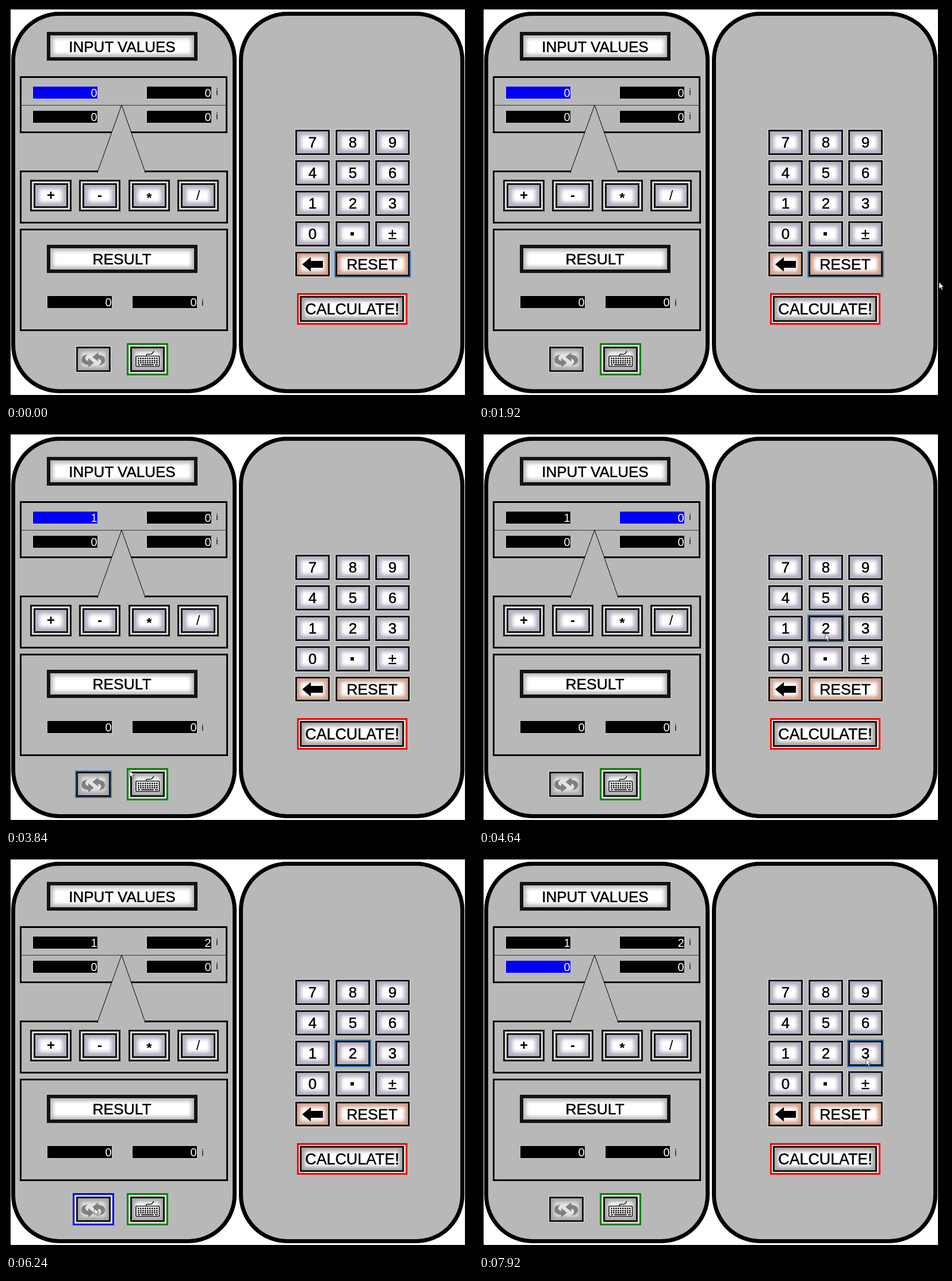
Animation, 812 px wide and 690 px high, one loop 8 s. Source, as an HTML page:

```html
<!DOCTYPE html>
<html lang="en">
<head>
<meta charset="utf-8">
<title>Complex number calculator</title>
<style>
  html, body { margin: 0; width: 100%; height: 100%; overflow: hidden; background: #000; }
  div, svg { position: absolute; box-sizing: border-box; }
  svg { left: 0; top: 0; font-family: "Liberation Sans", Arial, sans-serif; }
  .panel { background: #b8b8b9; border: 7px solid #000; border-radius: 84px; }
  .group { border: 3px solid #000; }
  .title { border: 6px solid #141414; background: #fff; box-shadow: inset 0 0 6px 5px #b9b9b9; }
  .key { border: 3px solid #141414; background: #fff; outline: 1px solid #e9e9e9; }
  .lilac { box-shadow: inset 0 0 6px 7px #b5afc1; }
  .peach { box-shadow: inset 0 0 6px 6px #cf9f8a; }
  .gray { box-shadow: inset 0 0 6px 6px #a6a6a6; }
  .dim { background: #e4e4e4; }
  .frame { border: 3px solid; background: #d5d8d0; }
  .ring { border: 2px solid #3f7fbf; }
  .field { border: 1px solid #c8c8c4; background: #000; }
</style>
</head>
<body>
<svg id="art" width="812" height="690" viewBox="0 0 812 690"></svg>
<script>
const art = document.getElementById('art');

function box(x, y, w, h, cls, color) {
  const el = document.createElement('div');
  el.className = cls;
  el.style.cssText = `left:${x}px;top:${y}px;width:${w}px;height:${h}px`;
  if (color) el.style.borderColor = color;
  document.body.insertBefore(el, art);
  return el;
}

function shape(name, attrs) {
  const el = document.createElementNS('http://www.w3.org/2000/svg', name);
  for (const key in attrs) el.setAttribute(key, attrs[key]);
  art.append(el);
  return el;
}

function label(text, x, y, size, attrs) {
  const el = shape('text', { x, y, 'font-size': size, 'text-anchor': 'middle', fill: '#000', ...attrs });
  el.textContent = text;
  return el;
}

const heavy = { stroke: '#000', 'stroke-width': .5 };

function field(x, y) {
  const el = box(x, y, 114, 23, 'field');
  const text = label('0', x + 112.5, y + 19, 20, { 'text-anchor': 'end', fill: '#fff' });
  return { el, text };
}

// Panels and groups
box(8, 6, 790, 670, '').style.background = '#fff';
box(9, 10, 392, 663, 'panel');
box(405, 10, 392, 663, 'panel');
box(24, 122, 361, 99, 'group');
box(24, 286, 362, 92, 'group');
box(24, 387, 362, 178, 'group');
shape('path', { d: 'M27 172.5H383', stroke: '#333' });
shape('path', { d: 'M159 290L160 286L201 172L241 286L242 290', fill: '#b8b8b9', stroke: '#000' });

// Titles
box(71, 45, 262, 50, 'title');
box(71, 415, 262, 49, 'title');
label('INPUT VALUES', 202, 80, 26, heavy);
label('RESULT', 201.5, 449, 26.4, heavy);

// Fields
const inputs = [[46, 139], [244, 139], [46, 181], [244, 181]].map(([x, y]) => field(x, y));
field(71, 503);
field(219, 503);
for (const [x, y] of [[367, 155], [367, 197], [342, 521]]) label('i', x, y, 17, { fill: '#181824' });

// Operators
['+', '-', '*', '/'].forEach((sign, i) => {
  const x = Math.round(42 + i * 85.4);
  box(x, 302, 72, 55, 'frame', '#141414');
  box(x + 6, 308, 60, 43, 'key lilac');
  label(sign, x + 36, sign === '*' ? 342 : 337, 24, { 'font-weight': sign === '/' ? 400 : 700 });
});

// Keypad
const keyX = [503, 573, 642], keyY = row => 215 + row * 53;
['789', '456', '123', '0.±'].forEach((line, row) => [...line].forEach((sign, col) => {
  const x = keyX[col], y = keyY(row);
  box(x, y, 60, 44, 'key lilac');
  if (sign === '.') shape('rect', { x: x + 26, y: y + 19, width: 6, height: 6, fill: '#111' });
  else label(sign, x + 30, y + 31, 26, heavy);
}));
box(503, 427, 60, 43, 'key peach');
shape('path', { d: 'M515 449L530 436.5V443H551V455H530V461.5Z' });
box(573, 427, 129, 43, 'key peach');
label('RESET', 636.5, 458, 26.6, heavy);
box(506, 499, 192, 55, 'frame', '#f00');
box(511, 504, 181, 45, 'key gray');
label('CALCULATE!', 602, 536, 26.8, heavy);

// Lower buttons
const swapFrame = box(116, 586, 72, 56, 'frame', '#00f');
box(122, 592, 60, 44, 'key gray dim');
box(210, 586, 72, 56, 'frame', '#008000');
box(216, 592, 60, 44, 'key gray');
const half = 'M143 605Q131 607 131 615Q132 623 143 624V628L153 620L143 612V617Q138 616 138 612Q138 608 143 605Z';
shape('path', { d: half, fill: '#808080' });
shape('path', { d: half, fill: '#808080', transform: 'rotate(180 151.7 615)' });
shape('path', { d: 'M244 608C244 602 250 608 254 604Q256 602 257 600', fill: 'none', stroke: '#111', 'stroke-width': 1.6 });
shape('rect', { x: 226, y: 608.5, width: 40.5, height: 18, rx: 2, fill: '#fff', stroke: '#111', 'stroke-width': 1.6 });
for (const y of [612.5, 616.5, 620]) {
  shape('path', { d: `M229 ${y}H264`, stroke: '#111', 'stroke-width': 2.5, 'stroke-dasharray': '2.7 1.3' });
}
shape('path', { d: 'M229 623.5H233M235 623.5H257M259 623.5H264', stroke: '#111', 'stroke-width': 2 });

// Focus rings with the times they are on
const ringTimes = [
  [571, 425, 133, 47, 0, 2880],
  [501, 319, 64, 48, 2720, 3680],
  [120, 590, 64, 48, 3680, 4640],
  [571, 319, 64, 48, 4640, 6640],
  [120, 590, 64, 48, 6640, 7840],
  [640, 319, 64, 48, 7840, 8000]
].map(([x, y, w, h, from, to]) => ({ el: box(x, y, w, h, 'ring'), from, to }));

// Pointer
const arrow = shape('path', { d: 'M0 0V11.5L2.6 9.2L4.8 13.5L6.5 12.6L4.5 8.6H8Z', fill: '#fff', stroke: '#333', 'stroke-width': .8 });
const beam = shape('path', { d: 'M-3 -5.5H3M-3 5.5H3M0 -5.5V5.5', fill: 'none', stroke: '#222' });
const route = [
  [1920, 800, 480], [2480, 519, 357], [3040, 519, 357], [3440, 153, 612], [3680, 153, 612],
  [3840, 215, 590], [4400, 602, 352], [5200, 602, 352], [5280, 555, 375], [5440, 187, 561],
  [5600, 154, 612], [6640, 154, 612], [6960, 660, 383], [7200, 673, 352], [8000, 673, 352]
];

function pointerAt(t) {
  const i = route.findIndex(([time]) => time > t);
  if (i < 1) return null;
  const [t0, x0, y0] = route[i - 1], [t1, x1, y1] = route[i];
  const k = (t - t0) / (t1 - t0);
  return [x0 + (x1 - x0) * k, y0 + (y1 - y0) * k];
}

const show = (el, on) => { el.style.visibility = on ? 'visible' : 'hidden'; };

function draw(t) {
  const phase = t % 1000;
  const selected = t < 3880 ? 0 : t < 6640 ? 1 : 2;
  const lit = phase < 100 || phase >= 600;
  const waiting = t >= 6640 && t < 7600;
  inputs.forEach(({ el }, i) => {
    el.style.background = i === selected && lit && !waiting ? '#0000f2' : '#000';
  });
  inputs[0].text.textContent = t < 2800 ? '0' : '1';
  inputs[1].text.textContent = t < 4720 ? '0' : '2';
  show(swapFrame, phase >= 20 && phase < 520);
  for (const { el, from, to } of ringTimes) show(el, t >= from && t < to);

  const spot = pointerAt(t);
  const overText = spot && spot[0] < 387 && spot[1] > 387 && spot[1] < 566;
  show(arrow, spot && !overText);
  show(beam, overText);
  if (spot) for (const el of [arrow, beam]) el.setAttribute('transform', `translate(${spot})`);
}

const start = performance.now();
function tick() {
  const t = (performance.now() - start) % 8000;
  draw(Math.floor(t / 80) * 80);
  requestAnimationFrame(tick);
}
tick();
</script>
</body>
</html>
```
